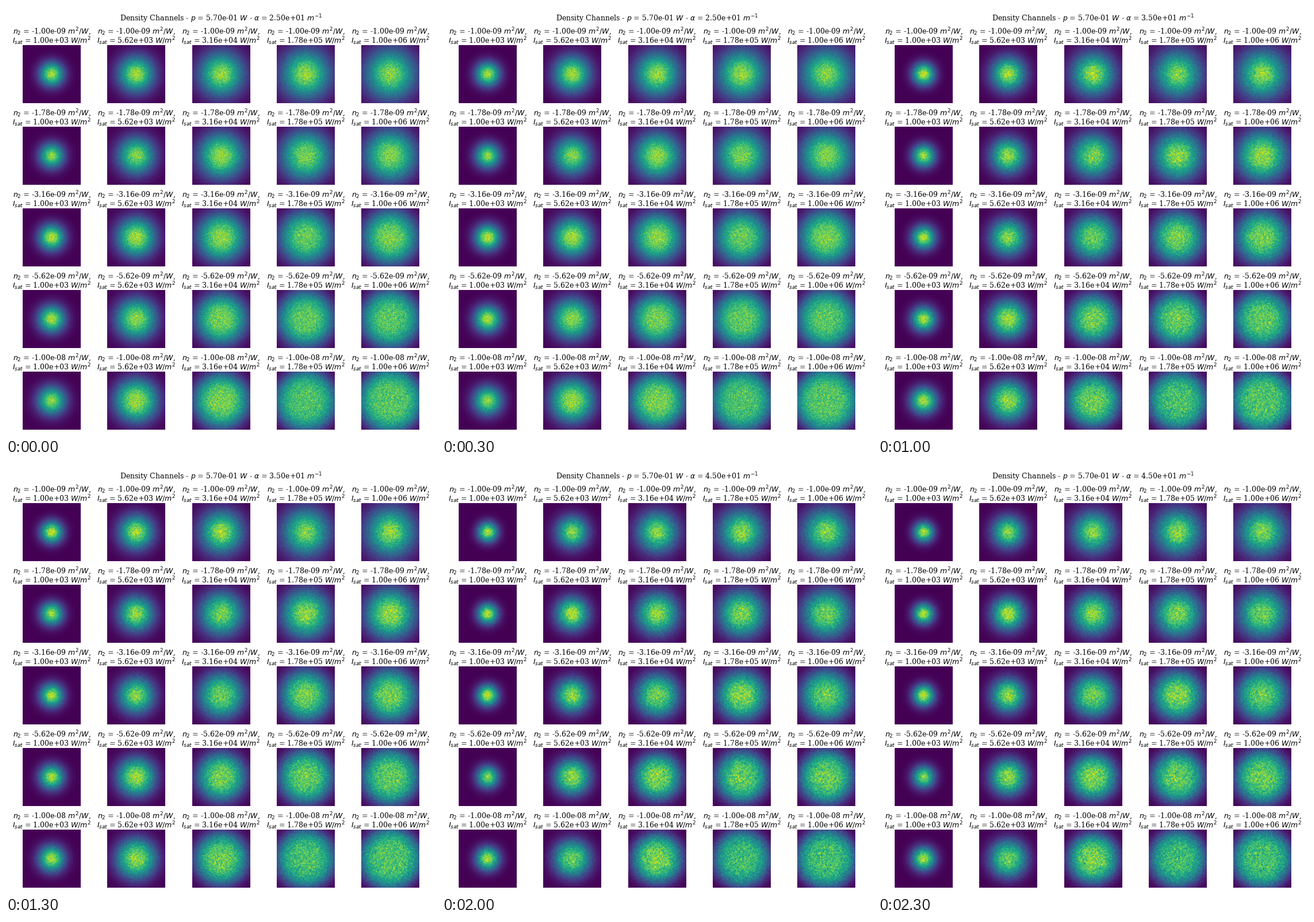
Animation, 748 px wide and 748 px high, one loop 2500 ms. Source, as a matplotlib script:

```python
import numpy as np
import matplotlib.pyplot as plt
from matplotlib.animation import FuncAnimation

plt.rcParams["font.family"] = "DejaVu Serif"

STAGE = 748
SIZE = 100.9          # panel side in pixels
COL_STEP, ROW_STEP = 147.3, 142
CENTER, BOTTOM = 374.1, 11.15
GRID = 101

N2 = -np.logspace(-9, -8, 5)
ISAT = np.logspace(3, 6, 5)
ALPHA = np.linspace(25, 45, 5)
SATURATION = [0, 0.42, 0.75, 0.93, 1]

axis = np.linspace(-50, 50, GRID)
RADIUS = np.hypot(*np.meshgrid(axis, axis))


def grain(rng, blur):
    """Unit-variance noise, slightly smeared over neighbouring cells."""
    noise = rng.standard_normal((GRID, GRID))
    for ax in (0, 1):
        noise = noise + blur * (np.roll(noise, 1, ax) + np.roll(noise, -1, ax))
    return noise / noise.std()


def density(row, col, step):
    """Noisy beam profile, wider and flatter with stronger defocusing."""
    sat = SATURATION[col]
    gain = (np.sqrt(N2[row] / N2[0]) - 1) / (np.sqrt(10) - 1)
    half = 16.8 + 18.2 * sat**0.9 + (3 + 13 * sat**1.4) * gain
    half *= 1 - step * (0.043 - 0.025 * sat)
    power = 2 + 2.5 * sat**2 * gain
    profile = 0.5 ** ((RADIUS / half) ** power)
    sigma = 0.055 + 0.015 * sat + 0.025 * sat * gain
    rng = np.random.default_rng(100 * step + 10 * row + col)
    image = profile * (1 + sigma * grain(rng, 0.15 + 0.07 * step))
    return 0.97 * image / image.max()


def label(x, baseline, text=""):
    """Centred text whose baseline is given in pixels from the top."""
    return fig.text(x / STAGE, 1 - baseline / STAGE, text, fontsize=9,
                    ha="center", va="baseline")


fig = plt.figure(figsize=(7.48, 7.48), dpi=100, facecolor="white")
heading = label(STAGE / 2, 26.5)

panels = {}
for row in range(5):
    for col in range(5):
        mid = CENTER + (col - 2) * COL_STEP
        low = BOTTOM + (4 - row) * ROW_STEP
        top = STAGE - low - SIZE
        ax = fig.add_axes([v / STAGE for v in (mid - SIZE / 2, low, SIZE, SIZE)])
        ax.set_axis_off()
        label(mid, top - 18.8, f"$n_2$ = {N2[row]:.2e} $m^2/W$,")
        label(mid, top - 2.8, f"$I_{{sat}}$ = {ISAT[col]:.2e} $W/m^2$")
        panels[row, col] = ax.imshow(np.zeros((GRID, GRID)), cmap="viridis",
                                     vmin=0, vmax=1, aspect="auto",
                                     interpolation="nearest")


def update(step):
    heading.set_text(f"Density Channels - $p$ = {0.57:.2e} $W$ - "
                     f"$\\alpha$ = {ALPHA[step]:.2e} $m^{{-1}}$")
    for (row, col), image in panels.items():
        image.set_data(density(row, col, step))
    return [heading, *panels.values()]


anim = FuncAnimation(fig, update, frames=5, interval=500, repeat=True,
                     repeat_delay=0, blit=False)
plt.show()
```
